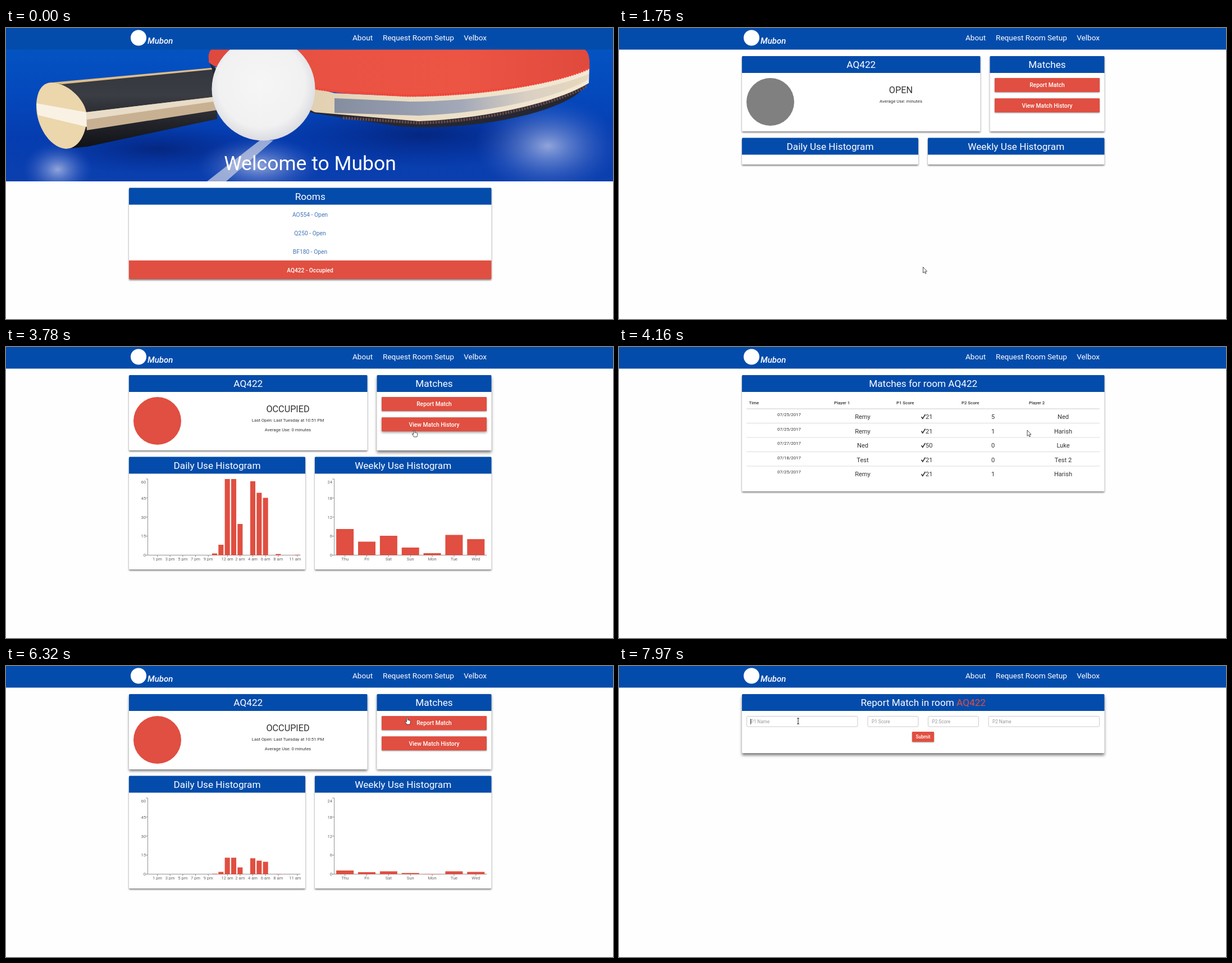
These frames come from a looping animation (1081 by 518 pixels, 8 s). An HTML page:

```html
<!DOCTYPE html>
<html lang="en">
<head>
<meta charset="utf-8">
<title>Room status</title>
<style>
  html, body { margin: 0; width: 100%; height: 100%; overflow: hidden; background: #fefefe; }
  svg { display: block; width: 100%; height: 100%; }
  text { font-family: Roboto, "DejaVu Sans", sans-serif; fill: #333; }
  .mid { text-anchor: middle; }
  .end { text-anchor: end; }
  .bold { font-weight: 500; }
  .white { fill: #fff; }
  .axis { fill: none; stroke: #777; stroke-width: .8; }
  .tick { fill: #666; font-size: 7.6px; }
</style>
</head>
<body>
<svg id="stage" viewBox="0 0 1081 518" preserveAspectRatio="none"></svg>
<script>
const LOOP = 8000;
const BLUE = '#044cab', RED = '#e04f41';
const HEAD = 17.2;

const stage = document.getElementById('stage');
const $ = id => document.getElementById(id);
const clamp = v => Math.max(0, Math.min(1, v));

// ---------- markup helpers ----------
const text = (x, y, size, content, cls = 'mid', extra = '') =>
  `<text x="${x}" y="${y}" font-size="${size}" class="${cls}" ${extra}>${content}</text>`;
const rect = (x, y, w, h, fill, extra = '') =>
  `<rect x="${x}" y="${y}" width="${w}" height="${h}" fill="${fill}" ${extra}/>`;
const path = (d, fill, extra = '') => `<path d="${d}" fill="${fill}" ${extra}/>`;
const group = (id, content) => `<g id="${id}">${content}</g>`;

const card = (id, x, y, w, h, title) =>
  rect(x, y, w, h, '#fff', `id="${id}" rx="1.5"`) +
  path(`M${x} ${y + 30}v-28.5q0-1.5 1.5-1.5h${w - 3}q1.5 0 1.5 1.5v28.5z`, BLUE) +
  text(x + w / 2, y + 21.2, HEAD, title, 'mid white');

const button = (id, y, label) =>
  rect(669, y, 187, 25, RED, `id="${id}" rx="1"`) + text(762.5, y + 16.4, 10.3, label, 'mid white bold');

// ---------- pages ----------
const stops = colors => colors.map((c, i) =>
  `<stop offset="${i / (colors.length - 1)}" stop-color="${c}"/>`).join('');
const across = (id, ...colors) => `<linearGradient id="${id}">${stops(colors)}</linearGradient>`;
const down = (id, ...colors) => `<linearGradient id="${id}" x2="0" y2="1">${stops(colors)}</linearGradient>`;

const defs = `<defs>` +
  down('table', '#0453c2', '#0449bd', '#053db0', '#0b3fae') +
  down('grip', '#34363d', '#3b3d44', '#23252b', '#101117') +
  across('rubber', '#dd4a3d', '#ea5343', '#ec5544', '#e04a3d') +
  across('band', '#858da0', '#929aac', '#a3a9b8', '#d9cfc3', '#e8d9bd') +
  across('timber', '#d8c19c', '#eadcc2', '#f3e9d6') +
  `<radialGradient id="glow"><stop stop-color="#b4bfe6" stop-opacity=".8"/><stop offset=".5" stop-color="#7f95d8" stop-opacity=".4"/><stop offset="1" stop-color="#3f60c8" stop-opacity="0"/></radialGradient>
  <radialGradient id="shade"><stop stop-color="#041f70" stop-opacity=".75"/><stop offset="1" stop-color="#04268a" stop-opacity="0"/></radialGradient>
  <radialGradient id="ball" cx=".48" cy=".45" r=".56"><stop stop-color="#f6f6f6"/><stop offset=".75" stop-color="#f1f1f2"/><stop offset="1" stop-color="#d9dae0"/></radialGradient>
  <clipPath id="photo"><rect y="38" width="1081" height="235"/></clipPath>
</defs>`;

const spot = (fill, x, y, rx, ry) => `<ellipse cx="${x}" cy="${y}" rx="${rx}" ry="${ry}" fill="url(#${fill})"/>`;

const hero = `<g clip-path="url(#photo)">` +
  rect(0, 38, 1081, 235, 'url(#table)') +
  spot('shade', 270, 215, 200, 45) + spot('shade', 740, 190, 270, 60) +
  spot('glow', 92, 252, 62, 48) + spot('glow', 965, 210, 130, 85) + spot('glow', 450, 245, 110, 50) +
  path('M452 200H476L392 273H358Z', '#b9c3e0', 'opacity=".8"') +
  path('M82 97L376 71V162L146 211L106 215Z', 'url(#grip)') +
  path('M82 97L376 70V73L100 100Z', '#dcbd8c') +
  path('M142 150L376 122V146L144 182Z', '#c8b192') +
  path('M142 150L376 122V130L144 163Z', '#e8dcc8') +
  path('M82 97C108 98 138 124 143 150C147 180 132 216 106 215C76 212 54 172 54 140C54 116 62 97 82 97Z', '#ecd6ac') +
  path('M54 134L143 150L144 176L57 155Z', '#f9f2e4') +
  path('M362 60C380 90 480 112 585 122L720 132C860 128 980 105 1039 80C1040 108 1010 132 930 154C850 174 770 180 700 175L550 152L380 110Z', '#252732') +
  path('M361 55L585 116L720 122C860 120 980 94 1039 68L1038 98C980 134 850 162 735 166L550 150Z', 'url(#timber)') +
  path('M585 125L720 131C860 130 980 106 1038 82L1036 92C980 126 850 152 735 156L585 151Z', 'url(#band)') +
  path('M366 38H1030Q1041 44 1039 72C985 98 850 122 715 122L600 116C500 104 390 82 362 62Q358 44 366 38Z', 'url(#rubber)') +
  path('M362 58C390 80 500 102 600 114L715 120C850 120 985 96 1039 71', 'none', 'stroke="#f0463b" stroke-width="5" stroke-dasharray="3 1.5"') +
  path('M600 160L735 169C850 167 975 136 1034 104', 'none', 'stroke="#6a4a48" stroke-width="5" stroke-dasharray="3 2"') +
  `<circle cx="458.500" cy="108.500" r="92" fill="url(#ball)"/></g>`;

const home = hero +
  text(541.5, 253, 35.5, 'Welcome to Mubon', 'mid white') +
  card('roomsCard', 219, 284.6, 645.5, 162.4, 'Rooms') +
  ['AO554', 'Q250', 'BF180'].map((room, i) =>
    text(541.5, 335.7 + 33 * i, 10.3, room + ' - Open', 'mid', 'style="fill:#3f74b5"')).join('') +
  path('M219 413.700h645.500v31.800q0 1.500-1.500 1.500h-642.500q-1.500 0-1.500-1.500z', RED) +
  text(541.5, 434.5, 10.2, 'AQ422 - Occupied', 'mid white bold');

const BASE = 370.5, TOP = 235, CHART_W = 272;
const axes = (x, step) => {
  let out = path(`M${x} ${TOP}V${BASE}H${x + CHART_W}`, 'none', 'class="axis"');
  for (let i = 0; i <= 4; i++) {
    const y = BASE - i * (BASE - TOP) / 4;
    out += path(`M${x - 3.5} ${y}h3.5`, 'none', 'class="axis"') +
      text(x - 3.5, (i < 4 ? y : y + 5) + 2.8, 7.8, i * step, 'end tick');
  }
  return out;
};
const xLabel = (x, label, shift = 0) =>
  path(`M${x} ${BASE}v3.5`, 'none', 'class="axis"') + text(x + shift, 380, 7.6, label, 'mid tick');

const HOURS = { 10: 3, 11: 18.5, 12: 135.5, 13: 135.5, 14: 55.5, 16: 131.5, 17: 111, 18: 102, 20: 2, 23: .8 };
const DAYS = { Thu: 46.5, Fri: 24, Sat: 34.5, Sun: 13.5, Mon: 3.5, Tue: 36, Wed: 28.5 };
const hourX = i => 252.5 + CHART_W / 24 * (+i + .5);
const dayX = i => 584.5 + CHART_W / 7 * (i + .5) - .3;
const hourName = i => `${i % 12 || 12} ${i < 12 ? 'pm' : 'am'}`;

const charts = axes(252.5, 15) + axes(584.5, 6) +
  [1, 3, 5, 7, 9, 12, 14, 16, 18, 20, 23].map(i => xLabel(hourX(i), hourName(i), i === 23 ? -4 : 0)).join('') +
  Object.keys(DAYS).map((day, i) => xLabel(dayX(i), day)).join('') +
  path('', RED, 'id="hourBars"') + path('', RED, 'id="dayBars"');

const room =
  card('statusCard', 219, 50, 424.5, 134, 'AQ422') +
  card('matchCard', 660.5, 50, 204, 134, 'Matches') +
  button('reportButton', 89, 'Report Match') + button('historyButton', 125.3, 'View Match History') +
  card('dailyCard', 219, 195.5, 314, 47.5, 'Daily Use Histogram') +
  card('weeklyCard', 550, 195.5, 314.5, 47.5, 'Weekly Use Histogram') +
  `<circle id="lamp" cx="269.5" cy="131.5" r="42.5"/>` +
  group('idle', text(502, 116, 16.3, 'OPEN') + text(502, 133, 7.9, 'Average Use: minutes')) +
  group('live', text(502, 116, 16.2, 'OCCUPIED') +
    text(502, 133, 7.8, 'Last Open: Last Tuesday at 10:51 PM') +
    text(502, 150, 7.9, 'Average Use: 0 minutes') + charts);

const MATCHES = [
  ['07/25/2017', 'Remy', 21, 5, 'Ned'],
  ['07/25/2017', 'Remy', 21, 1, 'Harish'],
  ['07/27/2017', 'Ned', 50, 0, 'Luke'],
  ['07/18/2017', 'Test', 21, 0, 'Test 2'],
  ['07/25/2017', 'Remy', 21, 1, 'Harish']
];
const COLUMNS = [['Time', 231.5], ['Player 1', 383], ['P1 Score', 494], ['P2 Score', 610], ['Player 2', 730]];
const rule = (y, w) => path(`M227 ${y}H856`, 'none', `stroke="#ddd" stroke-width="${w}"`);

const matchRow = ([date, one, score1, score2, two], i) => {
  const y = 128 + 25.5 * i;
  return (i ? rule(110 + 25.5 * i, 1) : '') +
    text(303, y - 4.7, 7.9, date) + text(434, y, 11.1, one) +
    path(`M538.500 ${y - 3.8}l2.300 3.300l4.700-7.500`, 'none', 'stroke="#333" stroke-width="1.6"') +
    text(558.5, y, 11.1, score1, 'end') + text(666, y, 11.1, score2) + text(791, y, 11.1, two);
};
const list = card('listCard', 219, 50, 645.5, 48, 'Matches for room AQ422') +
  path('M586 73.200H638', 'none', 'id="underline" stroke="#fff" stroke-width="1"') +
  group('rows', COLUMNS.map(([name, x]) => text(x, 102, 7.8, name, 'bold')).join('') +
    rule(110, 1.4) + MATCHES.map(matchRow).join(''));

const field = (x, w, label) =>
  rect(x + .5, 89.5, w - 1, 18.5, '#fff', 'rx="2" stroke="#c6c6c6" stroke-width=".9"') +
  text(x + 7.5, 102, 8.2, label, '', 'style="fill:#999"');
const form =
  card('formCard', 219, 50, 645.5, 105, `Report Match in room <tspan fill="${RED}">AQ422</tspan>`) +
  field(227, 198.5, 'P1 Name') + field(442.5, 91, 'P1 Score') + field(550, 91, 'P2 Score') + field(657.5, 198.5, 'P2 Name') +
  rect(522, 117, 39, 18, RED, 'rx="1" style="filter:drop-shadow(0 1px 1px #0006)"') +
  text(541.5, 129, 8.2, 'Submit', 'mid white bold') +
  rect(234.2, 94, .9, 10, '#222', 'id="caret"');

const nav = rect(0, 0, 1081, 38.5, BLUE) +
  `<circle cx="236" cy="17.5" r="14" fill="#fff"/>` +
  text(252, 28, 15, 'Mubon', 'white bold', 'font-style="italic"') +
  text(617, 22, 13.6, 'About', 'white') + text(671, 22, 13.6, 'Request Room Setup', 'white') +
  text(856, 22, 13.6, 'Velbox', 'end white');

const outline = 'stroke="#222" stroke-width=".8" stroke-linejoin="round"';
const pointers = group('pointer',
  path('M0 0V10.500L2.400 8.400L4 11.800L5.500 11.100L4 7.700H7Z', '#fff', `id="arrow" ${outline}`) +
  path('M-1 1Q0-.6 1 1V4.300Q2 3.600 2.700 4.600Q3.800 4 4.300 5Q5.800 4.800 5.800 6.300Q6 9.500 4.800 12H-.5L-3.500 7.800Q-4 6.200-2.500 6.500L-1 7.700Z', '#fff', `id="hand" ${outline}`) +
  path('M-2-5H2M-2 5H2M0-5V5', 'none', 'id="beam" stroke="#222" stroke-width="1"'));

stage.innerHTML = defs + group('home', home) + group('room', room) +
  group('list', list) + group('form', form) + nav + pointers;

// ---------- timeline ----------
// Screen refreshes: start, end, number of refreshes.
const REFRESHES = [
  [330, 830, 7], [1200, 1200, 1], [1750, 1750, 1], [2070, 2870, 11], [2920, 3690, 11], [3780, 3780, 1],
  [4010, 4010, 1], [4160, 4160, 1], [4620, 5400, 11], [5480, 5630, 3], [5860, 6010, 3],
  [6170, 6720, 8], [6950, 7110, 3], [7270, 7800, 8], [7970, 7970, 1]
];
const PAGES = [[0, 'home'], [1750, 'room'], [4010, 'list'], [5860, 'room'], [6950, 'form']];
const SHAPES = [
  [0, 'arrow'], [720, 'hand'], [1200, 'arrow'], [3600, 'hand'], [4010, 'arrow'],
  [5550, 'hand'], [5860, 'arrow'], [6240, 'hand'], [6950, 'arrow'], [7680, 'beam']
];
// Pointer stops: time, x, y.
const STOPS = [
  [0, 556, 522], [250, 556, 522], [830, 541.5, 425.5], [2000, 541.5, 425.5], [2870, 639, 273],
  [3690, 727, 148], [4550, 727, 148], [5400, 604, 86], [5480, 604, 80], [5630, 612, 73],
  [6120, 612, 73], [6327, 714.5, 92], [6720, 739, 94], [7200, 739, 94], [7500, 560, 70], [7800, 319, 98]
];
// Hovered elements: id, enter, leave.
const HOVERS = [
  ['roomsCard', 600, 1750], ['statusCard', 5930, 6240], ['matchCard', 3450, 4010], ['matchCard', 6320, 6950],
  ['weeklyCard', 2560, 3250], ['listCard', 4620, 5860], ['formCard', 6950, 8200],
  ['historyButton', 3700, 4010], ['reportButton', 6330, 6950]
];
const SHADED = ['roomsCard', 'statusCard', 'matchCard', 'dailyCard', 'weeklyCard', 'listCard', 'formCard', 'historyButton', 'reportButton'];

const latest = (keys, t) => keys.filter(k => k[0] <= t).pop();

function refreshTime(t) {
  const found = latest(REFRESHES, t);
  if (!found) return 0;
  const [start, end, count] = found;
  if (count === 1) return start;
  const step = (end - start) / (count - 1);
  return Math.min(end, start + step * Math.floor((t - start) / step + .1));
}

function pointerAt(t) {
  const next = STOPS.findIndex(s => s[0] > t);
  if (next < 0) return STOPS[STOPS.length - 1].slice(1);
  const a = STOPS[next - 1], b = STOPS[next];
  const p = (t - a[0]) / (b[0] - a[0]);
  return [a[1] + (b[1] - a[1]) * p, a[2] + (b[2] - a[2]) * p];
}

// cubic-bezier(.25, .1, .25, 1)
function ease(x) {
  if (x <= 0 || x >= 1) return clamp(x);
  let low = 0, high = 1, s;
  for (let i = 0; i < 20; i++) {
    s = (low + high) / 2;
    if (.75 * s * (1 - s) + s ** 3 < x) low = s; else high = s;
  }
  return .3 * s * (1 - s) ** 2 + 3 * s * s * (1 - s) + s ** 3;
}

const bar = (center, width, height) =>
  `M${center - width / 2} ${BASE}v${-height}h${width}v${height}z`;
const show = (id, on) => { $(id).style.display = on ? '' : 'none'; };

function hoverLevel(id, t) {
  return Math.max(0, ...HOVERS.filter(h => h[0] === id)
    .map(([, enter, leave]) => Math.min(clamp((t - enter) / 90), 1 - clamp((t - leave) / 120))));
}

function shade(id, t) {
  const level = hoverLevel(id, t), small = id.endsWith('Button');
  const drop = small ? 1 + 2 * level : 2.6 + 2 * level;
  const blur = small ? 1 + 1.2 * level : 1.8 + level;
  $(id).style.filter = `drop-shadow(0 ${drop}px ${blur}px rgba(0,0,0,${small ? .4 : .5}))`;
}

function render(now) {
  const t = refreshTime(now);
  const page = latest(PAGES, t)[1];
  ['home', 'room', 'list', 'form'].forEach(id => show(id, id === page));

  const second = t >= 5860;
  const live = t >= (second ? 6170 : 2070);
  show('live', live);
  show('idle', !live);
  $('lamp').setAttribute('fill', live ? RED : '#808080');
  ['dailyCard', 'weeklyCard'].forEach(id => $(id).setAttribute('height', live ? 200.5 : 47.5));

  const start = second ? 6245 : 2145;
  const daily = ease((t - start) / 500), weekly = ease((t - start - 22) / 470);
  $('hourBars').setAttribute('d', Object.entries(HOURS).map(([i, h]) => bar(hourX(i), 9.1, h * daily)).join(''));
  $('dayBars').setAttribute('d', Object.values(DAYS).map((h, i) => bar(dayX(i), 31, h * weekly)).join(''));

  show('rows', t >= 4160);
  $('listCard').setAttribute('height', t >= 4160 ? 207 : 48);
  show('underline', t >= 5550);
  show('caret', t >= 7970);
  SHADED.forEach(id => shade(id, t));

  const shape = latest(SHAPES, t)[1];
  ['arrow', 'hand', 'beam'].forEach(id => show(id, id === shape));
  $('pointer').setAttribute('transform', `translate(${pointerAt(t).join(' ')})`);
}

const origin = performance.now();
function frame() {
  render((performance.now() - origin) % LOOP);
  requestAnimationFrame(frame);
}
frame();
</script>
</body>
</html>
```
